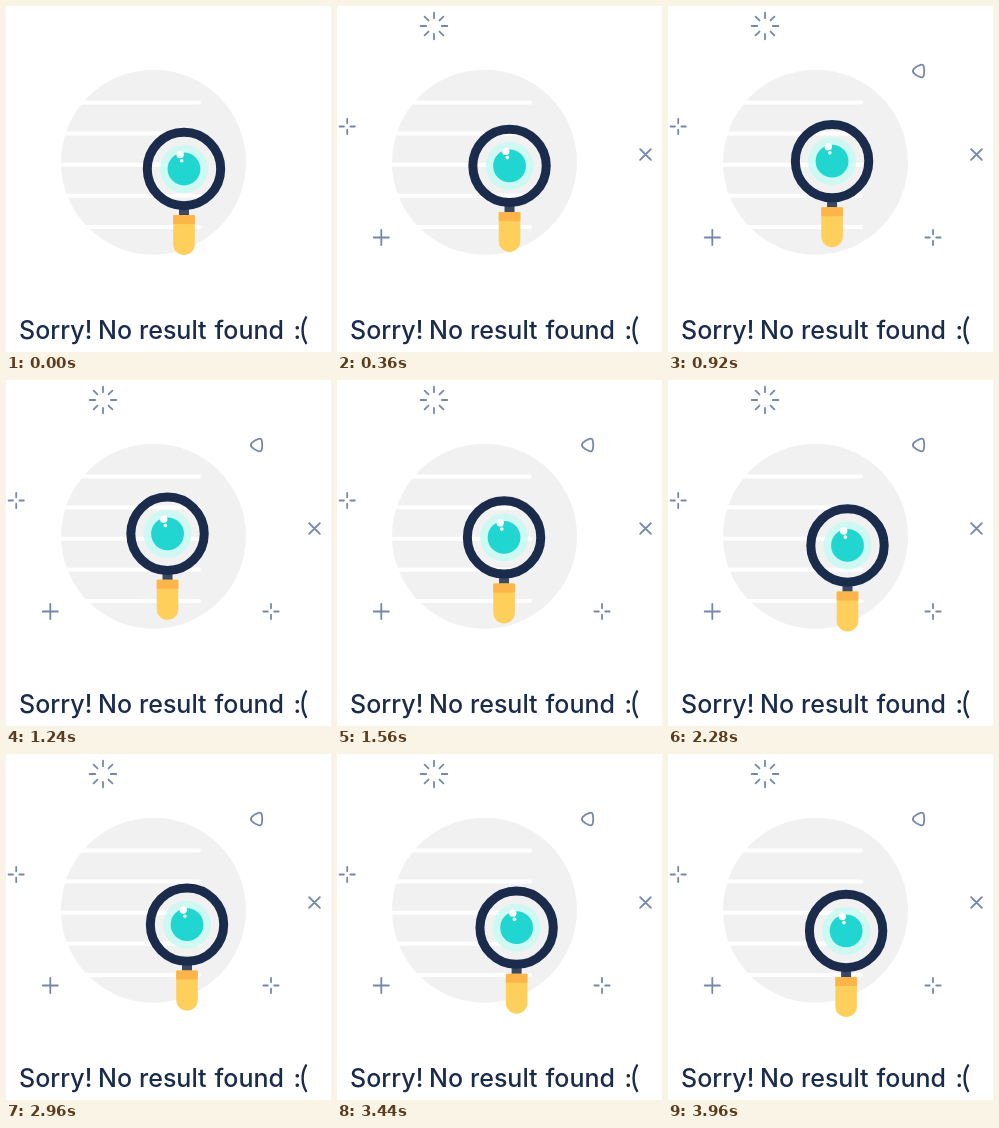
An HTML page with a canvas for the animation above (4 s loop, 325 px wide and 346 px high).

```html
<!DOCTYPE html>
<html lang="en">
<head>
<meta charset="utf-8">
<title>No result</title>
<style>
  html, body { margin: 0; width: 100%; height: 100%; overflow: hidden; background: #fff; }
  canvas { display: block; width: 325px; height: 346px; }
</style>
</head>
<body>
<canvas id="stage"></canvas>
<script>
const W = 325, H = 346, LOOP = 4000, TAU = Math.PI * 2;
const NAVY = '#1a2b4c', SLATE = '#7488ac';
const canvas = document.getElementById('stage');
const ctx = canvas.getContext('2d');
const ratio = window.devicePixelRatio || 1;
canvas.width = W * ratio;
canvas.height = H * ratio;

// Lens path: time, x, y
const path = [
  [0, 178, 163],
  [1170, 160.3, 153],
  [2454, 182.5, 167.4],
  [LOOP, 178, 177.2]
];

function lensAt(t) {
  let i = 0;
  while (i < path.length - 2 && t >= path[i + 1][0]) i++;
  const [t0, x0, y0] = path[i], [t1, x1, y1] = path[i + 1];
  const k = (t - t0) / (t1 - t0);
  return [x0 + (x1 - x0) * k, y0 + (y1 - y0) * k];
}

function disc(x, y, r, color) {
  ctx.fillStyle = color;
  ctx.beginPath();
  ctx.arc(x, y, r, 0, TAU);
  ctx.fill();
}

function rays(count, inner, outer, turn = 0) {
  ctx.beginPath();
  for (let i = 0; i < count; i++) {
    const a = turn + i * TAU / count, c = Math.cos(a), s = Math.sin(a);
    ctx.moveTo(c * inner, s * inner);
    ctx.lineTo(c * outer, s * outer);
  }
  ctx.stroke();
}

function pebble() {
  ctx.beginPath();
  ctx.moveTo(-5.2, -2.2);
  ctx.quadraticCurveTo(-7, 0, -5.2, 2.2);
  ctx.quadraticCurveTo(-2.5, 5, 1.5, 6.2);
  ctx.quadraticCurveTo(4.4, 6.8, 4.9, 3.8);
  ctx.quadraticCurveTo(5.6, 0, 4.9, -3.8);
  ctx.quadraticCurveTo(4.4, -6.8, 1.5, -6.2);
  ctx.quadraticCurveTo(-2.5, -5, -5.2, -2.2);
  ctx.closePath();
  ctx.stroke();
}

const marks = [
  { at: 40, x: 97, y: 20, draw: () => rays(8, 7.8, 13.3) },
  { at: 110, x: 10.2, y: 120.5, draw: () => rays(4, 3.2, 7.6) },
  { at: 180, x: 44.3, y: 231.5, draw: () => rays(4, 0, 7.6) },
  { at: 250, x: 308.5, y: 148.5, draw: () => rays(4, 0, 7.6, TAU / 8) },
  { at: 390, x: 251, y: 65, draw: pebble },
  { at: 460, x: 265, y: 231.5, draw: () => rays(4, 3.2, 7.6) }
];

function drawMarks(t) {
  ctx.strokeStyle = SLATE;
  ctx.lineWidth = 1.8;
  ctx.lineCap = 'round';
  for (const m of marks) {
    if (t < m.at) continue;
    ctx.save();
    ctx.globalAlpha = Math.min(1, (t - m.at) / 80);
    ctx.translate(m.x, m.y);
    m.draw();
    ctx.restore();
  }
}

function drawPage() {
  disc(147.5, 156.2, 92.5, '#f1f1f1');
  ctx.strokeStyle = '#fff';
  ctx.lineWidth = 4;
  ctx.lineCap = 'round';
  ctx.beginPath();
  for (let i = 0; i < 5; i++) {
    const y = 96.5 + i * 31.1;
    ctx.moveTo(50, y);
    ctx.lineTo(193, y);
  }
  ctx.stroke();
}

function drawLens(x, y) {
  ctx.save();
  ctx.translate(x, y);
  ctx.fillStyle = '#3b4862';
  ctx.fillRect(-5, 39, 10, 8);
  ctx.fillStyle = '#ffcf5c';
  ctx.beginPath();
  ctx.roundRect(-10.8, 46, 21.6, 40, [1, 1, 10.8, 10.8]);
  ctx.fill();
  ctx.fillStyle = '#fdb54a';
  ctx.beginPath();
  ctx.roundRect(-10.8, 46, 21.6, 9, [1, 1, 0, 0]);
  ctx.fill();

  disc(0, 0, 24, 'rgba(200, 250, 243, 0.85)');
  disc(0, 0, 16.4, '#21d6d0');
  disc(-3.8, -14.5, 3.7, '#fff');
  disc(-2.2, -8.3, 1.8, '#fff');

  ctx.strokeStyle = NAVY;
  ctx.lineWidth = 9;
  ctx.beginPath();
  ctx.arc(0, 0, 36.7, 0, TAU);
  ctx.stroke();
  ctx.restore();
}

function drawText() {
  ctx.fillStyle = NAVY;
  ctx.textBaseline = 'alphabetic';
  ctx.font = '500 25px Inter, "Open Sans", sans-serif';
  const words = [['Sorry!', 13], ['No', 92], ['result', 133], ['found', 208.5], [':', 287.5]];
  for (const [word, x] of words) ctx.fillText(word, x, 333);
  ctx.font = '400 31px Lato, sans-serif';
  ctx.fillText('(', 294, 334);
}

function render(t) {
  ctx.setTransform(ratio, 0, 0, ratio, 0, 0);
  ctx.fillStyle = '#fff';
  ctx.fillRect(0, 0, W, H);
  drawPage();
  drawMarks(t);
  drawLens(...lensAt(t));
  drawText();
}

const start = performance.now();
function tick() {
  render((performance.now() - start) % LOOP);
  requestAnimationFrame(tick);
}
tick();
</script>
</body>
</html>
```
